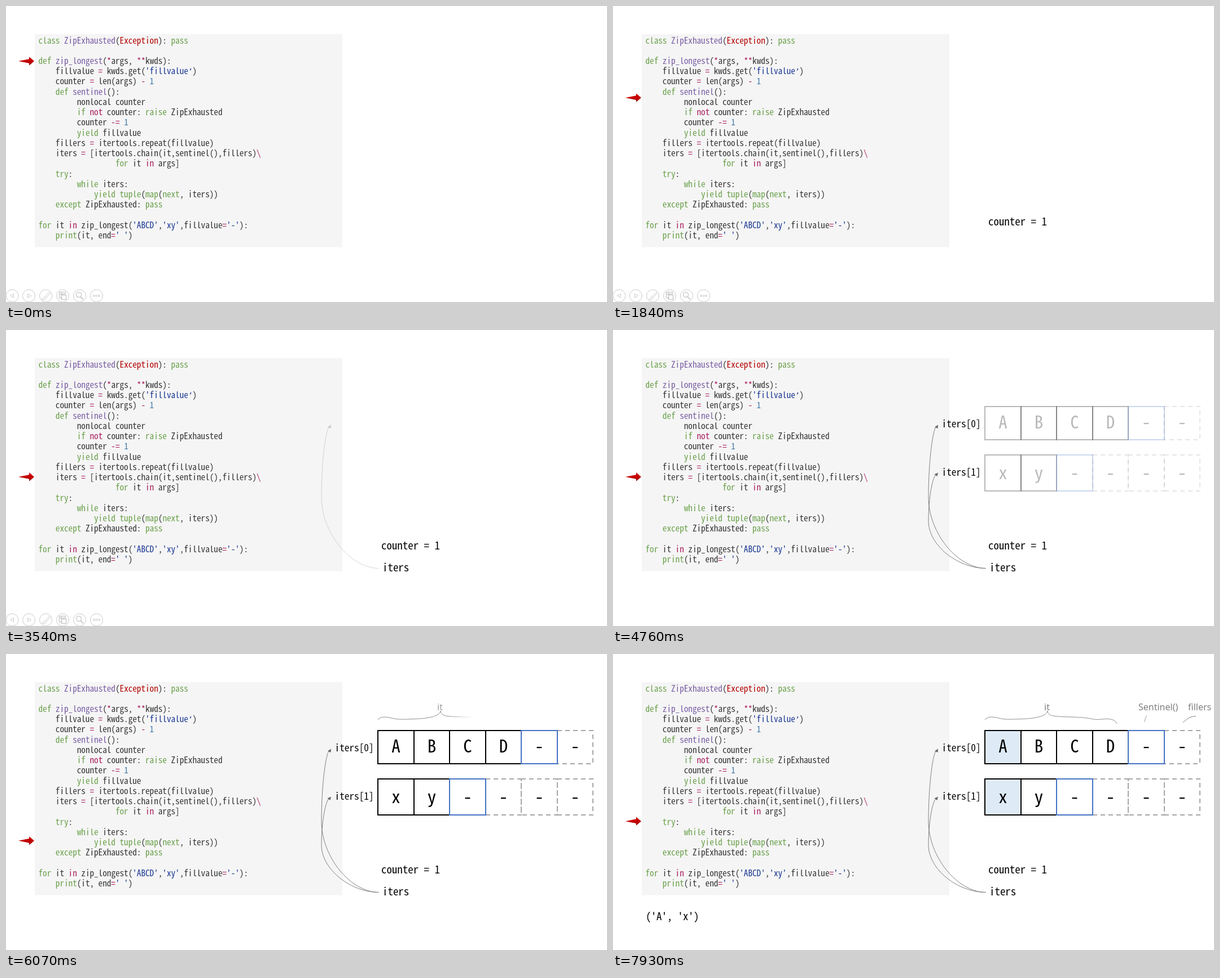
An HTML page that plays this animation: 1065x526 px, repeating every 8000 ms.

```html
<!DOCTYPE html>
<html lang="en">
<head>
<meta charset="utf-8">
<title>zip_longest step by step</title>
<style>
  html, body { margin: 0; width: 100%; height: 100%; overflow: hidden; background: #fff; }
  svg { display: block; width: 1065px; height: 526px; }
  text {
    font-family: "Noto Sans Mono CJK JP", "Noto Sans Mono CJK SC", "Noto Sans Mono", monospace;
    font-size: 18.9px; white-space: pre;
    letter-spacing: calc(var(--tight, 0) * 1em);
  }
  #code text { font-size: 15.16px; fill: #333; }
  .kw { fill: #6aa04b; } .fn { fill: #795da3; } .str, .quote { fill: #183691; }
  .op { fill: #a71d5d; } .num { fill: #4078a8; } .err { fill: #b50000; }
  .quote { font-family: "Noto Sans Mono", monospace; letter-spacing: -0.1em; }
  .name { font-size: 17.3px; }
  .cell text { font-size: 31px; letter-spacing: 0; text-anchor: middle; }
  .note text { font: 16px "Noto Sans", sans-serif; letter-spacing: 0; fill: #7f7f7f; }
  .line { fill: none; stroke: #7f7f7f; }
  .tip { fill: #666; }
</style>
</head>
<body>
<svg viewBox="0 0 1065 526">
  <defs>
    <linearGradient id="wipe" gradientUnits="userSpaceOnUse" y1="0" y2="0">
      <stop stop-color="#8c8c8c"/><stop offset="1" stop-color="#8c8c8c" stop-opacity="0"/>
    </linearGradient>
    <linearGradient id="red" x2="0" y2="1">
      <stop offset=".5" stop-color="#c80000"/><stop offset="1" stop-color="#8e0a08"/>
    </linearGradient>
  </defs>
  <rect x="51" y="50" width="545" height="378.5" fill="#f5f5f5"/>
  <g id="code"></g>
  <path id="pointer" d="M22 0L41 -3.800L41 -7.700L50 0L41 7.700L41 3.800Z" fill="url(#red)"/>

  <g id="toolbar" fill="none" stroke="#cbcbcb">
    <path d="M13.5 511.500V518.500L7.500 515Z M38.500 511.500V518.500L44.500 515Z"/>
    <path d="M77 508.500L69 516.500L71 518.500L78.500 510Z M69 517C65 517 67 521 63.500 521C68 523 71 521 71 518.500"/>
    <path d="M94.500 519V508.500H105.500V512 M94.500 512H105 M98.500 508.500V519H94.500" stroke-width="1.5"/>
    <path d="M98.500 513.500H106.500V521.500H98.500Z" stroke-width="1.5"/>
    <path d="M132 516.500L137 521.500" stroke-width="2"/><circle cx="129" cy="513" r="4.500" stroke-width="1.5"/>
    <circle cx="156" cy="515" r="1.5"/><circle cx="160.500" cy="515" r="1.5"/><circle cx="165" cy="515" r="1.5"/>
  </g>

  <text id="counter" x="665" y="390">counter = 1</text>
  <text id="iters" x="667" y="429">iters</text>
  <g id="link0">
    <path class="line" d="M661 423.500C610 423.500 559 360 559 297C559 233.500 567 171 574 171"/>
    <path class="tip" d="M576 168.500L570 172.500L575.500 175Z"/>
  </g>
  <text id="name0" class="name" x="582.500" y="173">iters[0]</text>
  <g id="link1">
    <path class="line" d="M661 423.500C610 423.500 559 382 559 339.500C559 297 567 256 574 256"/>
    <path class="tip" d="M576 253.500L569.500 256.500L574.500 260Z"/>
  </g>
  <text id="name1" class="name" x="582.500" y="259">iters[1]</text>
  <g id="taken" fill="#deebf7">
    <rect x="659" y="136" width="64" height="59"/><rect x="659" y="222" width="64" height="64"/>
  </g>
  <g id="cells"></g>

  <path d="M659 117C663 111 672 111 684 114S705 116 722 115.500S768 113 770 101C771 111 780 111 815 112S850 118 865 116S890 116 893 124" fill="none" stroke="url(#wipe)"/>
  <g id="noteIt" class="note"><text x="764" y="99.500">it</text></g>
  <g id="noteSentinel" class="note">
    <text x="931" y="100">Sentinel()</text><path class="line" d="M946 109C943 113 943 116 942 121" stroke-opacity=".75"/>
  </g>
  <g id="noteFillers" class="note">
    <text x="1019" y="100">fillers</text><path class="line" d="M1033 110.500C1019 111 1017 117 1010 121.500"/>
  </g>
  <text id="output" x="58" y="473">('A', 'x')</text>
</svg>
<script>
const $ = id => document.getElementById(id);

// Bring the monospaced advance to half an em
const probe = document.createElement("canvas").getContext("2d");
probe.font = `100px ${getComputedStyle($("counter")).fontFamily}`;
document.body.style.setProperty("--tight", 0.5 - probe.measureText("0").width / 100);

const source = String.raw`class ZipExhausted(Exception): pass

def zip_longest(*args, **kwds):
    fillvalue = kwds.get('fillvalue’)
    counter = len(args) - 1
    def sentinel():
         nonlocal counter
         if not counter: raise ZipExhausted
         counter -= 1
         yield fillvalue
    fillers = itertools.repeat(fillvalue)
    iters = [itertools.chain(it,sentinel(),fillers)\
                  for it in args]
    try:
         while iters:
             yield tuple(map(next, iters))
    except ZipExhausted: pass

for it in zip_longest('ABCD','xy',fillvalue='-'):
    print(it, end=' ')`;

const token = /(?<fn>(?<=(?:class|def) )\w+)|(?<str>'[^'’]*'?)|(?<quote>’)|(?<kw>\b(?:class|pass|def|if|raise|yield|for|try|while|except|tuple|map|next|print)\b)|(?<op>\b(?:not|in)\b|[-=*\\]+)|(?<num>\d+)|(?<err>Exception)/g;

const paint = (match, ...rest) => {
  const kind = Object.entries(rest.at(-1)).find(([, value]) => value)[0];
  return `<tspan class="${kind}">${match}</tspan>`;
};

$("code").innerHTML = source.split("\n").map((line, i) => {
  const indent = line.search(/\S|$/);
  return `<text x="${57.5 + indent * 7.58}" y="${66.5 + i * 18.24}">${line.trim().replace(token, paint)}</text>`;
}).join("");

$("toolbar").innerHTML += [11, 40.5, 70.5, 100.5, 130.5, 160.5]
  .map(x => `<circle cx="${x}" cy="515" r="11"/>`).join("");

// Dashed cells lie lowest, then the letters, then the blue sentinel
const styles = ['stroke="#a6a6a6" stroke-dasharray="8 6"', 'stroke="#000"', 'stroke="#4472c4"'];
const rows = [
  { letters: "ABCD", top: 136, height: 59, base: 175 },
  { letters: "xy", top: 222, height: 64, base: 265 },
];
const cellX = i => Math.round(659 + i * 63.5);
for (const { letters, top, height, base } of rows) {
  const level = i => i < letters.length ? 1 : i === letters.length ? 2 : 0;
  const order = [0, 1, 2, 3, 4, 5].sort((a, b) => level(a) - level(b));
  $("cells").innerHTML += order.map(i => {
    const x = cellX(i), width = cellX(i + 1) - x;
    return `<g class="cell"><rect x="${x}" y="${top}" width="${width}" height="${height}" fill="none"
      stroke-width="2" ${styles[level(i)]}/><text x="${x + width / 2}" y="${base}">${letters[i] || "-"}</text></g>`;
  }).join("");
}
const cells = document.querySelectorAll(".cell");

const progress = (t, from, to) => Math.min(1, Math.max(0, (t - from) / (to - from)));
const smooth = u => (1 - Math.cos(Math.PI * u)) / 2;

const fades = {
  counter: [950, 1450], iters: [2700, 3200],
  link0: [3470, 3700], name0: [3640, 3890], link1: [3890, 4140], name1: [4140, 4440],
  noteIt: [5700, 6200], noteSentinel: [6270, 6770], noteFillers: [6770, 7270],
  taken: [6400, 6900], output: [6650, 7150],
};

function draw(t) {
  for (const id in fades) $(id).style.opacity = progress(t, ...fades[id]);
  for (const cell of cells) cell.style.opacity = progress(t, 4490, 5490);
  $("toolbar").style.opacity = t < 4150 ? 1 : 0;

  const y = 98 + 37 * smooth(progress(t, 380, 950)) + 126 * progress(t, 1560, 2820)
    + 76 * smooth(progress(t, 5530, 6180)) - 40 * smooth(progress(t, 7230, 7960));
  $("pointer").setAttribute("transform", `translate(0 ${y})`);

  const drop = -30 * (1 - progress(t, 2700, 3200)) ** 2;
  $("iters").setAttribute("transform", `translate(0 ${drop})`);

  const edge = 614 + 280 * progress(t, 5770, 6270);
  $("wipe").setAttribute("x1", edge);
  $("wipe").setAttribute("x2", edge + 45);
}

function frame() {
  draw(performance.now() % 8000);
  requestAnimationFrame(frame);
}
frame();
</script>
</body>
</html>
```
